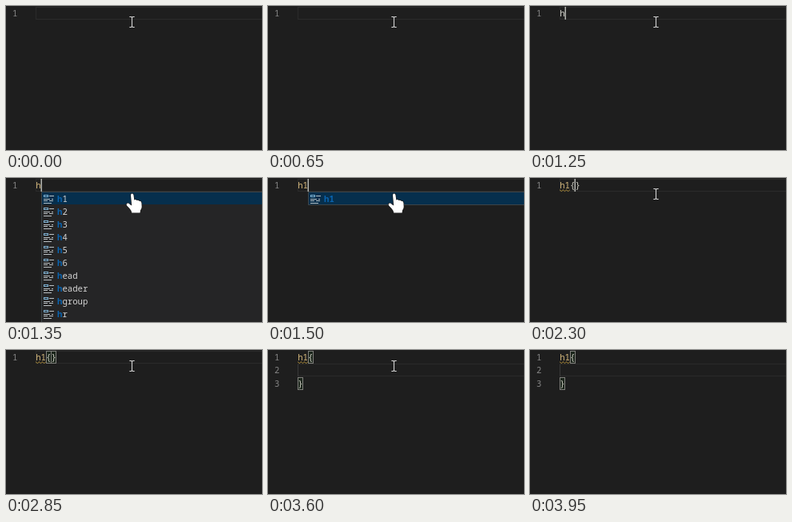
These frames come from a looping animation (320x180 px, 4000 ms). An HTML page with a canvas:

```html
<!DOCTYPE html>
<html lang="en">
<head>
<meta charset="utf-8">
<title>Typing a rule</title>
<style>
  html, body { margin: 0; width: 100%; height: 100%; overflow: hidden; background: #1e1e1e; }
  canvas { display: block; width: 320px; height: 180px; }
</style>
</head>
<body>
<canvas id="stage" width="320" height="180"></canvas>
<script>
const ctx = document.getElementById('stage').getContext('2d');
const LOOP = 4000;
const LEFT = 37.2, CHAR = 6.4, ROW = 16.35;
const FONT = '"Noto Sans Mono", "DejaVu Sans Mono", monospace';
const TAGS = ['h1', 'h2', 'h3', 'h4', 'h5', 'h6', 'head', 'header', 'hgroup', 'hr', 'html'];

const colX = col => LEFT + col * CHAR;
const rowY = row => 1 + row * ROW;
const within = (t, a, b) => t >= a && t < b;

function rect(x, y, w, h, color) {
  ctx.fillStyle = color;
  ctx.fillRect(x, y, w, h);
}

function frame(x, y, w, h, color) {
  ctx.strokeStyle = color;
  ctx.lineWidth = 1;
  ctx.strokeRect(x, y, w, h);
}

function text(str, x, y, color, weight = 500) {
  ctx.font = `${weight} 10.67px ${FONT}`;
  ctx.fillStyle = color;
  ctx.fillText(str, x, y);
}

function code(str, col, row, color) {
  text(str, colX(col), rowY(row) + 12, color);
}

function lineBox(row) {
  frame(37.5, Math.round(rowY(row)) + 0.5, 300, 15, '#2b2b2b');
}

function caret(col, row) {
  rect(Math.round(colX(col)) - 0.5, Math.round(rowY(row)), 1.5, 16, '#b4b5b0');
}

function bracket(col, row) {
  const x = Math.round(colX(col)) + 0.5, y = Math.round(rowY(row)) + 0.5;
  rect(x, y, 6, 15, 'rgba(0,100,0,.1)');
  frame(x, y, 6, 15, '#7f7f7b');
}

function squiggle() {
  ctx.beginPath();
  for (let x = 0; x <= 12.5; x += 0.5) {
    ctx.lineTo(LEFT + x, 15.7 - Math.cos(x * Math.PI / 2.1) * 0.9);
  }
  ctx.strokeStyle = '#c09a3c';
  ctx.lineWidth = 1;
  ctx.stroke();
}

function keywordIcon(x, y) {
  const ink = '#b9bfc2';
  frame(x + 0.5, y + 0.5, 5, 2, '#7fb4d6');
  rect(x + 7, y + 1, 6, 1, ink);
  rect(x, y + 5, 8, 1, ink);
  rect(x + 10, y + 5, 2, 1, ink);
  rect(x, y + 7, 5, 1, ink);
  rect(x + 7, y + 7, 5, 1, ink);
  rect(x, y + 10, 10, 1, ink);
}

function popup(x, tags, typed) {
  const top = 17;
  rect(x, top, 320 - x, tags.length * 16 + 1, '#252526');
  rect(x, top, 320 - x, 16, '#062f4d');
  tags.forEach((tag, i) => {
    const y = top + i * 16;
    keywordIcon(x + 3, y + 4);
    text(tag.slice(0, typed), x + 20, y + 13, '#0a64b0', 700);
    text(tag.slice(typed), x + 20 + typed * CHAR, y + 13, '#d4d4d4');
  });
  frame(x + 0.5, top + 0.5, 300, tags.length * 16, '#3c4448');
}

function beam(x, y) {
  ctx.strokeStyle = '#d2d2d2';
  ctx.lineWidth = 1.1;
  ctx.beginPath();
  ctx.moveTo(x, y - 5.5);
  ctx.lineTo(x, y + 5.5);
  for (const s of [-1, 1]) {
    ctx.moveTo(x - 3.2, y + s * 6.5);
    ctx.lineTo(x - 1, y + s * 6.5);
    ctx.lineTo(x, y + s * 5.5);
    ctx.lineTo(x + 1, y + s * 6.5);
    ctx.lineTo(x + 3.2, y + s * 6.5);
  }
  ctx.stroke();
}

function hand() {
  const p = new Path2D(
    'M156 21.5 Q156 19.5 157.6 19.5 Q159.3 19.5 159.5 21.5 L160.3 27.5' +
    ' Q162.2 26.3 163.4 28 Q165.2 27 166.4 28.8 Q168.8 28.2 169.4 31' +
    ' L169.7 36 Q169.7 38.5 168 40.5 L167.6 43.5 L157.2 43.5' +
    ' Q156.8 40.5 154.6 38.2 L150.8 34.2 Q150 32.2 151.8 31.6' +
    ' Q153.4 31.2 154.8 33 L157.2 34.5 Z');
  ctx.strokeStyle = '#101010';
  ctx.lineWidth = 1.2;
  ctx.stroke(p);
  ctx.fillStyle = '#fff';
  ctx.fill(p);
}

function pointer(t) {
  if (within(t, 1350, 2200)) return hand();
  if (t >= 3950) return;
  const step = t < 3800 ? 0 : Math.floor((t - 3800) / 50) + 1;
  const k = (step / 3) ** 1.6;
  beam(157.5 + 102 * k, 20 + 56 * k);
}

function draw(t) {
  const typed = t < 1250 ? 0 : t < 1500 ? 1 : 2;
  const braces = t >= 2300, split = t >= 3100;
  const endRow = split ? 2 : 0, endCol = split ? 0 : 3;

  rect(0, 0, 320, 180, '#1e1e1e');
  lineBox(split ? 1 : 0);

  for (let row = 0; row <= endRow; row++) code(row + 1, -4.55, row, '#858585');

  if (within(t, 2400, 3100) || t >= 3200) {
    bracket(2, 0);
    bracket(endCol, endRow);
  }
  code('h1'.slice(0, typed), 0, 0, t < 1350 ? '#d4d4cc' : '#d7ba7d');
  if (t >= 2150) squiggle();
  if (braces) {
    code('{', 2, 0, '#d0d0c4');
    code('}', endCol, endRow, '#d0d0c4');
  }
  if (split) rect(37, 18, 1, 15, '#383838');

  if (within(t, 1350, 1500)) popup(44, TAGS, 1);
  if (within(t, 1500, 2300)) popup(50, ['h1'], 2);

  if (within(t, 150, 650) || within(t, 1150, 2100)) caret(typed, 0);
  if (within(t, 2300, 2850)) caret(3, 0);
  if (within(t, 3100, 3600)) caret(4, 1);

  pointer(t);
}

const start = performance.now();
function tick(now) {
  draw(Math.max(0, now - start) % LOOP);
  requestAnimationFrame(tick);
}
draw(0);
requestAnimationFrame(tick);
</script>
</body>
</html>
```
